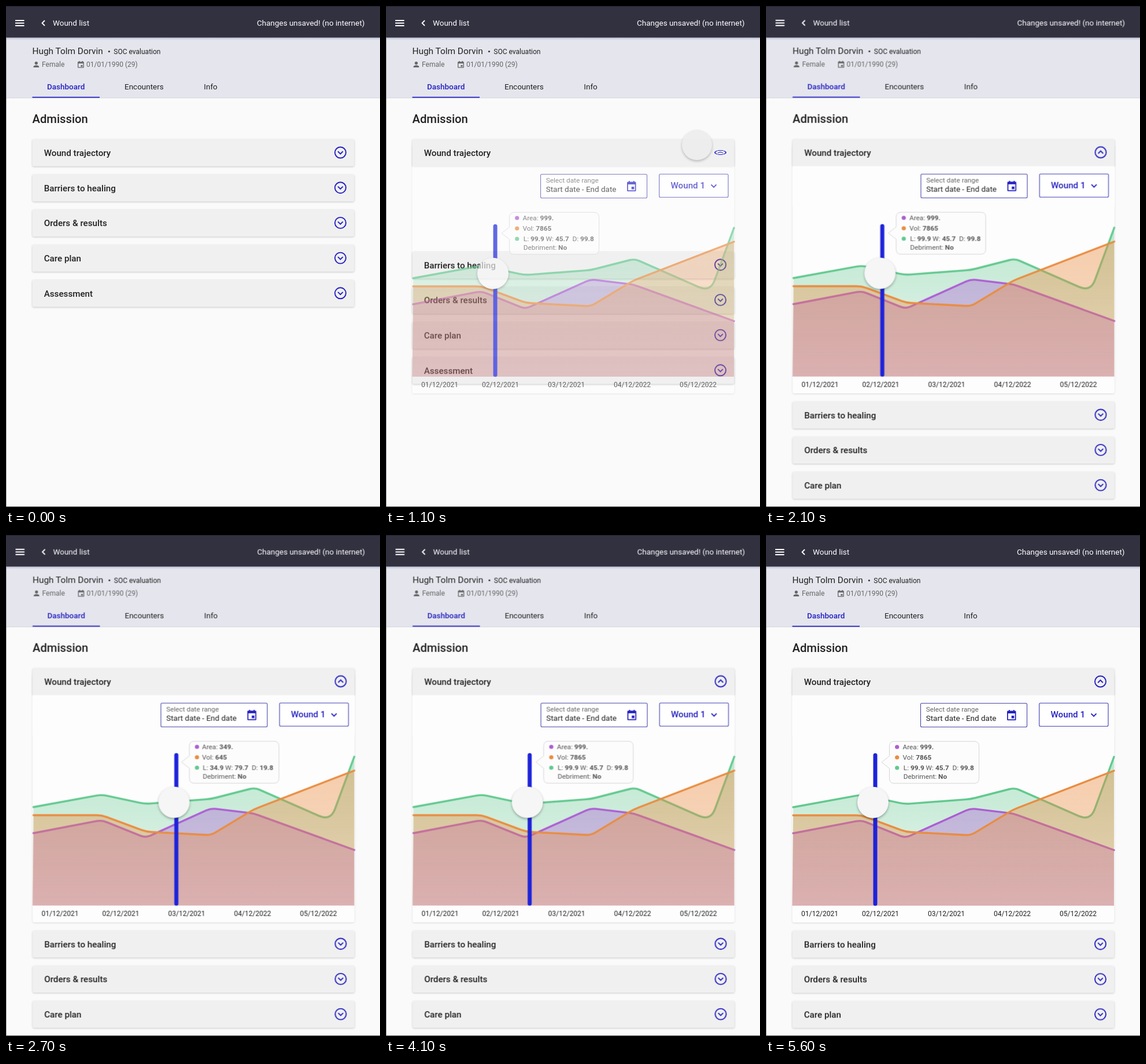
These frames come from a looping animation (647 px wide and 865 px high, 5.7 s). An HTML page:

```html
<!DOCTYPE html>
<html lang="en">
<head>
<meta charset="utf-8">
<title>Wound dashboard</title>
<style>
  html, body { margin: 0; width: 100%; height: 100%; overflow: hidden; background: #fafafa; }
  svg { display: block; width: 647px; height: 865px; font: 13.48px Roboto, sans-serif; }
  text { fill: #212121; white-space: pre; }
  .m { font-weight: 500; }
  .title { font-size: 15.16px; font-weight: 500; }
  .small { font-size: 12.03px; }
  .grey { fill: #666; }
  .light text { fill: #fff; }
  .blue { fill: #2420c2; }
  .line { fill: none; stroke: #2420c2; stroke-width: 1.9; }
  .tip text { font-size: 11.8px; fill: #555; }
  .tip tspan { font-weight: 700; }
  .card { fill: #f0f0f0; filter: drop-shadow(0 1.5px 1.5px #0003); }
  .knob { filter: drop-shadow(0 2px 2px #0005); }

  .shift, .below, .chart, .turn, .touch, .slider, .tip, .a, .b {
    animation: 5.7s infinite;
  }
  .shift { animation-name: shift; animation-timing-function: step-end; }
  .below { animation-name: below; }
  .chart { animation-name: show; }
  .turn { animation-name: turn; transform-origin: 578.5px 253px; }
  .touch { animation-name: touch; filter: drop-shadow(0 2px 2px #0004); }
  .slider { animation-name: drag; }
  .tip { animation-name: tip; }
  .a { animation-name: first; animation-timing-function: step-end; }
  .b { animation-name: second; animation-timing-function: step-end; }

  @keyframes shift {
    0%, 55.79%, 82.81% { transform: none; }
    32.63%, 57.89% { transform: translate(.5px, -.3px); }
  }
  @keyframes below {
    0%, 17.54% { transform: none; animation-timing-function: ease-in-out; }
    21.93%, 100% { transform: translateY(392.4px); }
  }
  @keyframes show {
    0%, 17.54% { opacity: 0; }
    21.93%, 100% { opacity: 1; }
  }
  @keyframes turn {
    0%, 17.54% { transform: none; }
    21.93%, 100% { transform: scaleY(-1); }
  }
  @keyframes touch {
    0%, 14.04% { opacity: 0; fill: #fff; }
    15.79% { opacity: .35; fill: #fcfcfc; }
    21.93%, 23.5% { opacity: 1; fill: #ebebeb; }
    28.5%, 100% { opacity: 0; fill: #ebebeb; }
  }
  @keyframes drag {
    0%, 32.63% { transform: none; animation-timing-function: cubic-bezier(.37, 0, .63, 1); }
    55.79%, 57.89% { transform: translateX(148px); animation-timing-function: cubic-bezier(.37, 0, .63, 1); }
    82.81%, 100% { transform: none; }
  }
  @keyframes tip {
    0%, 32.63% { transform: none; }
    55.79%, 57.89% { transform: translateX(-2.2px); }
    82.81%, 100% { transform: none; }
  }
  @keyframes first {
    0%, 70.35% { opacity: 1; }
    44.2% { opacity: 0; }
  }
  @keyframes second {
    0%, 70.35% { opacity: 0; }
    44.2% { opacity: 1; }
  }
</style>
</head>
<body>
<svg viewBox="0 0 647 865">
  <defs>
    <linearGradient id="green" x2="0" y2="1">
      <stop stop-color="#62c98f" stop-opacity=".42"/><stop offset="1" stop-color="#62c98f" stop-opacity=".12"/>
    </linearGradient>
    <linearGradient id="purple" x2="0" y2="1">
      <stop stop-color="#ab5cd4" stop-opacity=".38"/><stop offset="1" stop-color="#ab5cd4" stop-opacity=".34"/>
    </linearGradient>
    <linearGradient id="orange" x2="0" y2="1">
      <stop stop-color="#ea8c40" stop-opacity=".42"/><stop offset="1" stop-color="#ea8c40" stop-opacity=".32"/>
    </linearGradient>
    <linearGradient id="shade" x2="0" y2="1">
      <stop stop-color="#b9bdd0"/><stop offset="1" stop-color="#e4e5ed"/>
    </linearGradient>
  </defs>

  <path fill="#fafafa" d="M0 0h647v865H0z"/>
  <path fill="#e4e5ed" d="M0 54h647v105H0z"/>
  <path fill="#d3d5de" d="M0 158.3h647v1H0z"/>
  <path fill="url(#shade)" d="M0 54h647v5H0z"/>
  <path fill="#323140" d="M0 0h647v54.5H0z"/>

  <g class="shift">
    <g class="light">
      <path stroke="#fff" stroke-width="1.8" d="M16 25h15.5M16 29.5h15.5M16 34h15.5"/>
      <path fill="none" stroke="#fff" stroke-width="1.8" d="M67 25l-4.5 4.5 4.5 4.5"/>
      <text x="81" y="34">Wound list</text>
      <text x="434" y="34">Changes unsaved! (no internet)</text>
    </g>

    <text x="45.5" y="83" font-size="15.4">Hugh Tolm Dorvin</text>
    <circle cx="178.4" cy="78.5" r="1.6" fill="#333"/>
    <text class="small" x="186.3" y="83">SOC evaluation</text>
    <g class="grey">
      <circle cx="52.3" cy="98.6" r="2.6"/>
      <path d="M47.5 106v-1.3c0-3.4 9.6-3.4 9.6 0v1.3z"/>
      <path fill-rule="evenodd" d="M124 97.2q0-1 1-1h1V95h1.5v1.2h4V95h1.5v1.2h.8q1 0 1 1v8.6q0 1-1 1H125q-1 0-1-1zM125.3 99.2v6.3h8.2v-6.3zM129.4 101.9h3.1v2.9h-3.1z"/>
    </g>
    <text class="small grey" x="62" y="105.3">Female</text>
    <text class="small grey" x="139" y="105.3">01/01/1990 (29)</text>

    <text class="m blue" x="71" y="143.5">Dashboard</text>
    <text x="205" y="143.5">Encounters</text>
    <text x="342.3" y="143.5">Info</text>
    <path class="blue" d="M45.5 156.7H162v1.8H45.5z"/>
    <text class="m" x="45.5" y="201.5" font-size="20.2">Admission</text>

    <g class="chart">
      <rect x="45.5" y="240" width="557" height="429" rx="3" fill="#fdfdfd" style="filter:drop-shadow(0 1.5px 1.5px #0002)"/>
    </g>
    <g id="top"></g>
    <g class="below" id="rest"></g>

    <g class="chart">
      <path fill="#fdfdfd" d="M45.5 276.5h557v70h-557z"/>
      <rect x="267.5" y="290.5" width="184" height="41" rx="2" fill="#fff" stroke="#4845a8" stroke-width="1.1"/>
      <text class="grey" x="276.7" y="305" font-size="11.8">Select date range</text>
      <text x="276.7" y="321">Start date - End date</text>
      <path class="blue" fill-rule="evenodd" d="M417 305q0-1.5 1.5-1.5h1.5V302h1.8v1.5h6V302h1.8v1.5h1.4q1.5 0 1.5 1.5v13.5q0 1.5-1.5 1.5h-12.5q-1.5 0-1.5-1.5zM418.8 308v10.2h11.9V308zM424.7 312h4.5v4.5h-4.5z"/>
      <rect x="472.7" y="290.3" width="119.3" height="40" rx="2" fill="#fff" stroke="#3d3ab4" stroke-width="1.1"/>
      <text class="title" x="492.5" y="315" style="fill:#2420c2">Wound 1</text>
      <path class="line" d="M562.5 308.3l4.5 4.5 4.5-4.5"/>
      <g id="plot"></g>
      <g id="dates"></g>

      <g class="slider">
        <path stroke="#1d23da" stroke-width="7" stroke-linecap="round" d="M189 380.3v256.5"/>
        <circle class="knob" cx="185" cy="461.7" r="27" fill="#f6f6f6"/>
        <g class="tip">
          <path fill="#fcfcfc" stroke="#d5d5d8" d="M222 356.3h138q8.5 0 8.5 8.5v55.500q0 8.500-8.500 8.500H222q-8.500 0-8.500-8.500V403l-13.500-10.700 13.500-10.700v-16.800q0-8.500 8.500-8.500z"/>
          <circle cx="226.7" cy="366" r="3.6" fill="#ad5dd3"/>
          <circle cx="226.7" cy="384" r="3.6" fill="#ea8c40"/>
          <circle cx="226.7" cy="402" r="3.6" fill="#62c98f"/>
          <g class="a" id="before"></g>
          <g class="b" id="after"></g>
        </g>
      </g>
    </g>
    <circle class="touch" cx="538" cy="240" r="26"/>
  </g>

  <path fill="#8d8d92" d="M0 55h.8v810H0z"/>
  <path fill="#222129" d="M0 0h647v1H0z"/>
  <path fill="#55555a" d="M0 864h647v1H0z"/>
</svg>
<script>
  const put = (id, html) => document.getElementById(id).innerHTML = html;

  const panel = (name, i) => {
    const y = 60.7 * i;
    return `<g transform="translate(0 ${y})">
      <rect class="card" x="45.500" y="230" width="557" height="46.700" rx="3"/>
      <text class="title" x="65.700" y="259">${name}</text>
      <g class="${i ? '' : 'turn'}"><circle class="line" cx="578.5" cy="253" r="9.500"/>
      <path class="line" d="M574.2 251l4.300 4.300 4.300-4.300"/></g></g>`;
  };
  const names = ['Wound trajectory', 'Barriers to healing', 'Orders &amp; results', 'Care plan', 'Assessment'];
  const panels = names.map(panel);
  put('top', panels[0]);
  put('rest', panels.slice(1).join(''));

  // Polyline with each inner corner rounded over r pixels
  const smooth = (pts, radii = []) => pts.map(([x, y], i) => {
    if (!i) return `M${x} ${y}`;
    if (i === pts.length - 1) return `L${x} ${y}`;
    const r = radii[i] || 9;
    const toward = ([u, v]) => {
      const k = r / Math.hypot(u - x, v - y);
      return `${x + (u - x) * k} ${y + (v - y) * k}`;
    };
    return `L${toward(pts[i - 1])}Q${x} ${y} ${toward(pts[i + 1])}`;
  }).join('');

  const series = (id, color, pts, radii) => {
    const d = smooth(pts, radii);
    return `<path fill="url(#${id})" d="${d}V640H45.500z"/>
      <path fill="none" stroke="${color}" stroke-width="3.400" stroke-linecap="round" d="${d}"/>`;
  };
  put('plot',
    series('green', '#62c98f', [[47, 470], [165, 448.5], [240, 464.5], [354, 456], [430, 436.5], [561, 494], [602, 383]], [0, 0, 0, 0, 0, 22]) +
    series('purple', '#ad5dd3', [[47, 515], [165, 492.5], [241, 523], [354, 472], [428, 481], [602, 544]]) +
    series('orange', '#ea8c40', [[47, 484], [165, 484], [242, 512.5], [354, 518.5], [428, 474], [602, 407]]));

  const days = ['01/12/2021', '02/12/2021', '03/12/2021', '04/12/2022', '05/12/2022'];
  const dayX = [61, 166, 280, 394, 508];
  put('dates', days.map((d, i) => `<text class="small" x="${dayX[i]}" y="658.300">${d}</text>`).join(''));

  const b = s => `<tspan>${s}</tspan>`;
  const details = (area, vol, l, w, d, dx) => `<g transform="translate(${dx} 0)">
    <text x="236.500" y="370.300">Area: ${b(area)}</text>
    <text x="236.500" y="388.300">Vol: ${b(vol)}</text>
    <text x="237.800" y="406.300">L: ${b(l)} W: ${b(w)}\u00a0 D: ${b(d)}</text>
    <text x="237.800" y="421">Debriment: ${b('No')}</text></g>`;
  put('before', details('999.', '7865', '99.9', '45.7', '99.8', 0));
  put('after', details('349.', '645', '34.9', '79.7', '19.8', -1));
</script>
</body>
</html>
```
